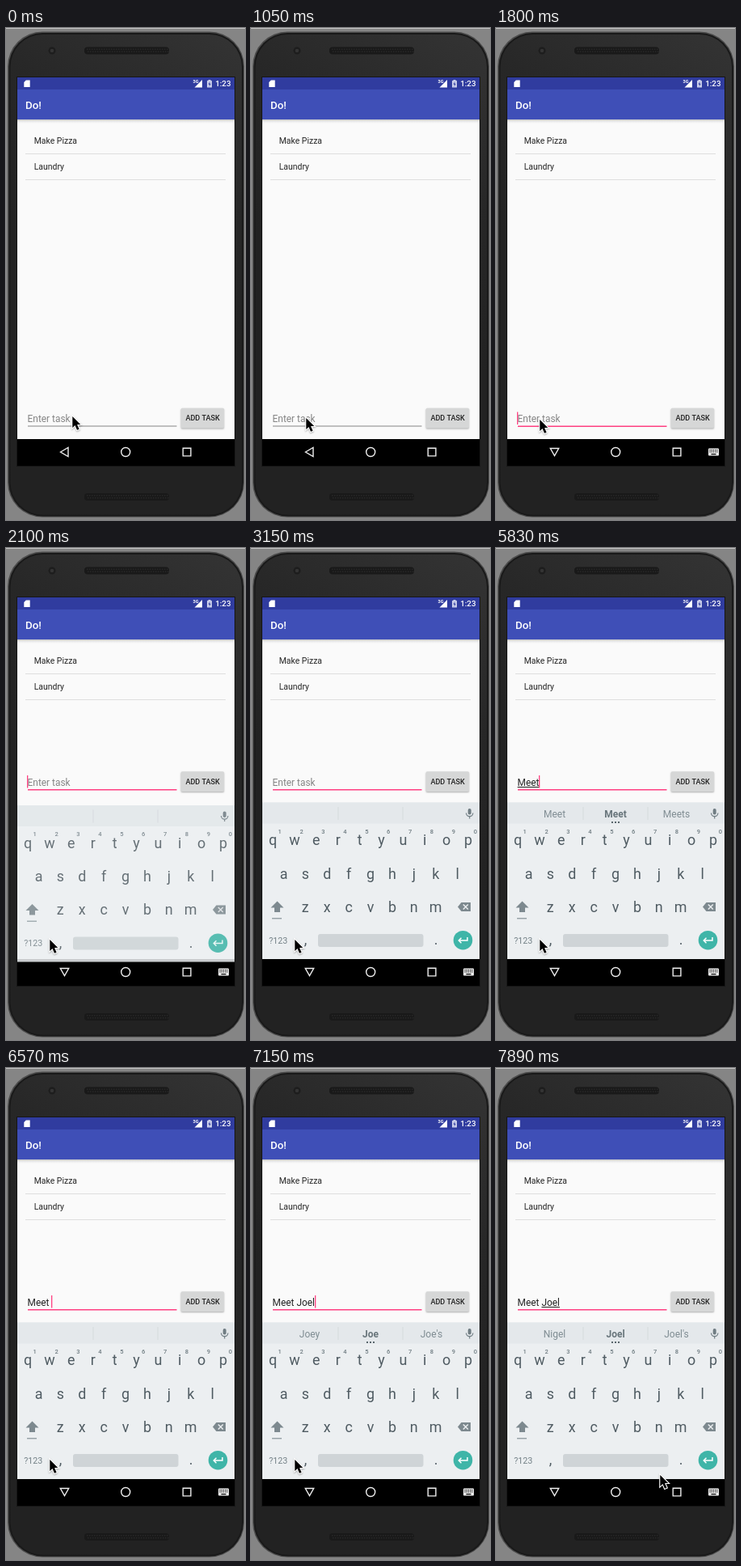
An HTML page with a canvas for the animation above (8 s loop, 296 px wide and 608 px high).

```html
<!DOCTYPE html>
<html lang="en">
<head>
<meta charset="utf-8">
<title>Task list</title>
<style>
html, body { margin: 0; width: 100%; height: 100%; overflow: hidden; background: #858585; }
canvas { display: block; width: 296px; height: 608px; }
</style>
</head>
<body>
<canvas id="stage" width="296" height="608"></canvas>
<script>
const c = document.getElementById('stage').getContext('2d');
const LOOP = 8000, PINK = '#ff4081', KEY = '#4f5b62', DIM = '#7f8c92';

// Each step: start time, typed text, caret shown, suggestions, underlined tail
const meet = ['Meet', 'Meet', 'Meets'];
const friend = ['Nigel', 'Joel', "Joel's"];
const steps = [
  [0, '', 0], [1500, '', 1], [2250, '', 0], [2700, '', 1], [3150, '', 0],
  [3750, '', 1], [4190, '', 0], [4790, '', 1],
  [5090, 'M', 1],
  [5230, 'Me', 1, ['Me', 'M', 'More']],
  [5380, 'Me', 1, ['Mr', 'Me', 'Men'], 'Me'],
  [5530, 'Mee', 1, ['Mr', 'Me', 'Men']],
  [5680, 'Meet', 1, ['Meet', 'Mee', 'Need']],
  [5830, 'Meet', 1, meet, 'Meet'],
  [6280, 'Meet', 0, meet, 'Meet'],
  [6420, 'Meet ', 1, meet],
  [6570, 'Meet ', 1],
  [6710, 'Meet J', 1],
  [6860, 'Meet Jo', 1, ['Just', 'J', 'Join']],
  [7000, 'Meet Joe', 1, ['To', 'Jo', 'Job']],
  [7150, 'Meet Joel', 1, ['Joey', 'Joe', "Joe's"]],
  [7300, 'Meet Joel', 1, friend, 'Joel'],
  [7590, 'Meet Joel', 0, friend, 'Joel']
];

function rect(x, y, w, h, fill, r = 0) {
  c.fillStyle = fill;
  c.beginPath();
  c.roundRect(x, y, w, h, r);
  c.fill();
}

function text(s, x, y, size, fill, weight = 400, align = 'left') {
  c.font = `${weight} ${size}px Roboto, sans-serif`;
  c.textAlign = align;
  c.fillStyle = fill;
  c.fillText(s, x, y);
}

function path(d, fill, stroke, width = 1) {
  const p = new Path2D(d);
  if (stroke) { c.strokeStyle = stroke; c.lineWidth = width; c.stroke(p); }
  if (fill) { c.fillStyle = fill; c.fill(p); }
}

function disc(x, y, r, fill) {
  c.fillStyle = fill;
  c.beginPath();
  c.arc(x, y, r, 0, 7);
  c.fill();
}

function blend(x0, y0, x1, y1, ...colors) {
  const g = c.createLinearGradient(x0, y0, x1, y1);
  colors.forEach((color, i) => g.addColorStop(i / (colors.length - 1), color));
  return g;
}

function speaker(y) {
  rect(97, y, 105, 9, '#191919', 4);
  for (let x = 100; x < 200; x += 3)
    for (let j = 2; j < 8; j += 3) rect(x + j % 2, y + j, 1.5, 1.5, '#282828');
}

function phone() {
  rect(0, 0, 296, 608, '#858585');
  rect(0, 0, 296, 1, '#c4c4c4');
  rect(2, 4.5, 293, 600, '#4b4b4b', 43);
  rect(3.5, 6, 290.5, 597.5, '#191919', 42);
  rect(5.5, 8, 286.5, 593.5, blend(90, 300, 270, 10, '#222', '#272727', '#333'), 40);
  speaker(23.5);
  speaker(575);
  disc(57, 28, 4.5, '#1d1d1d');
  disc(57, 28, 2.3, '#343434');
  rect(13, 60, 271, 482, '#161616');
}

function statusBar() {
  rect(14, 61, 269, 15, '#303c9f');
  path('M24.8 64.5H29.7V73H22.3V67Z', '#fff');
  text('3G', 231.5, 68, 5.5, '#fff', 700);
  path('M243 64V73.5H233.5Z', '#fff');
  rect(249, 65, 6, 8.5, '#c9cdea', .5);
  rect(250.5, 64, 3, 1.5, '#c9cdea');
  path('M252.5 66L250.5 69.7H252L251.7 72.5L253.7 68.8H252.2Z', '#303c9f');
  text('1:23', 259.2, 72.3, 9.8, '#fff', 500);
}

function app() {
  rect(14, 76, 269, 465, '#fafafa');
  rect(14, 113, 269, 5, blend(0, 113, 0, 118, '#c6c6c6', '#ececec', '#fafafa'));
  rect(14, 76, 269, 37, '#3f4fb7');
  statusBar();
  text('Do!', 24, 100, 13.4, '#fff', 500);
  ['Make Pizza', 'Laundry'].forEach((s, i) => {
    text(s, 34.7, 143.3 + 32 * i, 10.46, '#252525');
    rect(24, 155 + 32 * i, 248, 1, '#dedede');
  });
}

function entry(top, focused, [, typed, caret, , tail]) {
  c.save();
  c.translate(0, top);
  if (focused) rect(27, 491.5, 184.5, 1.5, PINK);
  else rect(27, 491.5, 184.5, 1, '#868686');
  text(typed || 'Enter task', 26.6, 487, 11.9, typed ? '#222' : '#858585');
  const end = 26.6 + c.measureText(typed).width;
  if (tail) {
    const w = c.measureText(tail).width;
    rect(end - w, 488.5, w, 1, '#222');
  }
  if (caret) rect(Math.round(end - .4), 474.5, 1.3, 15.5, PINK);
  c.shadowColor = 'rgba(0,0,0,.3)';
  c.shadowBlur = 2;
  c.shadowOffsetY = 1;
  rect(216.7, 469.7, 53.3, 24.8, '#d6d7d7', 1.5);
  c.shadowColor = 'transparent';
  text('ADD TASK', 243.5, 485.4, 9.05, '#222', 500, 'center');
  c.restore();
}

function suggestions(words) {
  rect(14, 314.5, 269, 26, '#e4e8eb');
  rect(107.5, 320, 1, 16, '#d3d9dc');
  rect(187.5, 320, 1, 16, '#d3d9dc');
  if (words) {
    words.forEach((s, i) =>
      text(s, 72.5 + 75.5 * i, 333, 12, i === 1 ? '#68757b' : DIM, i === 1 ? 700 : 400, 'center'));
    for (let i = 0; i < 3; i++) rect(143 + 4 * i, 338, 2, 2, '#59666c');
  }
  rect(268.7, 322, 4, 7.5, '#707d83', 2);
  path('M266.5 327.5a4.2 4.2 0 0 0 8.4 0M270.7 331.5V334.5', null, '#707d83', 1.2);
}

function keyboard(words) {
  rect(14, 314.5, 269, 193.5, '#eceff1');
  suggestions(words);
  const row = (keys, x, y) =>
    [...keys].forEach((k, i) => text(k, x + 26.9 * i, y, 17.9, KEY, 400, 'center'));
  row('qwertyuiop', 27, 367.3);
  row('asdfghjkl', 40.5, 408.5);
  row('zxcvbnm', 67.3, 449.5);
  [...'1234567890'].forEach((d, i) => text(d, 35.7 + 26.9 * i, 352.8, 7.5, '#6f7c82', 500, 'center'));
  path('M32.5 436.5L40.5 444.5H36V450H29V444.5H24.5Z', '#7d898f');
  rect(26, 457, 12, 1.5, '#98a3a8');
  path('M256 443.5L260.5 438H272V449H260.5Z', '#7d898f');
  path('M262.8 440.5L268.8 446.5M268.8 440.5L262.8 446.5', null, '#eceff1', 1.4);
  text('?123', 22.3, 488.5, 10.7, '#748187');
  text(',', 67.5, 490, 17.9, KEY, 400, 'center');
  rect(83, 477, 130.5, 16, '#cfd4d7', 3);
  text('.', 229, 490, 17.9, KEY, 400, 'center');
  disc(262.5, 484.7, 11.8, '#3fb5a8');
  path('M268 481V485H257.5M260.5 481.8L257.3 485L260.5 488.2', null, '#fff', 1.5);
}

function navBar(open) {
  rect(14, 508, 269, 33, '#000');
  path(open ? 'M67.3 519.5H77.7L72.5 528.7Z' : 'M67.5 524L77 518.5V529.5Z', null, '#eee', 1.4);
  path('M153.7 524a5.5 5.5 0 1 1-11 0a5.5 5.5 0 1 1 11 0Z', null, '#eee', 1.4);
  path('M219.2 519.3H228.9V528.9H219.2Z', null, '#eee', 1.4);
  if (!open) return;
  rect(263, 519.5, 13, 9, '#eee', 1);
  for (let i = 0; i < 5; i++) {
    rect(264.4 + 2.2 * i, 521, 1.2, 1.2, '#000');
    rect(264.4 + 2.2 * i, 523.3, 1.2, 1.2, '#000');
  }
  rect(266.5, 526, 6, 1.2, '#000');
}

// Progress of a stepped move, in ticks of 150 ms
const ticks = (t, start, n) => Math.max(0, Math.min(1, (Math.floor((t - start) / 150) + 1) / n));

function pointer(t) {
  const a = ticks(t, 900, 4), b = ticks(t, 7590, 3);
  c.save();
  c.translate(82.3 - 28 * a + 149 * b, 480 + 4 * a + 19 * b);
  c.shadowColor = 'rgba(0,0,0,.3)';
  c.shadowBlur = 2;
  c.shadowOffsetY = 1;
  path('M0 0V14L3.2 11L5.7 16.8L8.3 15.7L5.8 10H10Z', null, '#fff', 2.2);
  c.shadowColor = 'transparent';
  path('M0 0V14L3.2 11L5.7 16.8L8.3 15.7L5.8 10H10Z', '#000');
  c.restore();
}

function draw(t) {
  const step = steps.findLast(s => s[0] <= t);
  const open = t >= 1800, raised = t >= 1950;
  phone();
  app();
  entry(raised ? -193.5 : 0, t >= 1500, step);
  navBar(open);
  if (raised) {
    const [drop, alpha] = t < 2100 ? [12, .4] : t < 2250 ? [3.5, .86] : [0, 1];
    c.save();
    c.globalAlpha = alpha;
    c.translate(0, drop);
    keyboard(step[3]);
    c.restore();
  }
  pointer(t);
}

const start = performance.now();
function frame() {
  draw((performance.now() - start) % LOOP);
  requestAnimationFrame(frame);
}
frame();
</script>
</body>
</html>
```
